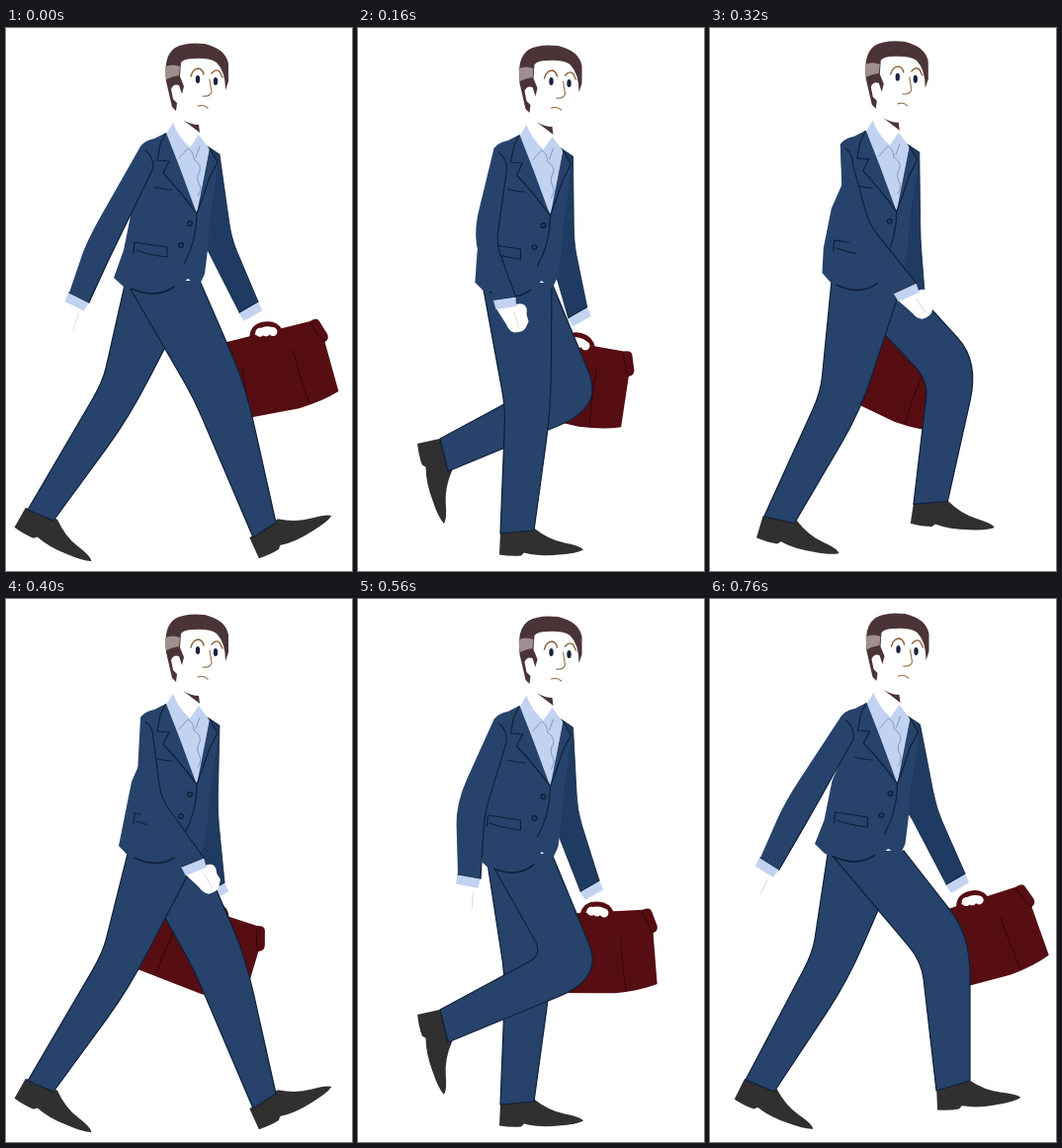
Recreate the animation shown at these times as an HTML page with a canvas. Size 350 by 550 pixels, loop 0.8 s.

```html
<!DOCTYPE html>
<html lang="en">
<head>
<meta charset="utf-8">
<title>Walking man</title>
<style>
  html, body { margin: 0; height: 100%; overflow: hidden; background: #fff; }
  canvas { display: block; width: 100vw; height: 100vh; }
</style>
</head>
<body>
<canvas id="stage" width="350" height="550"></canvas>
<script>
const ctx = document.getElementById('stage').getContext('2d');
const LOOP = 800, STEP = 40;
const SUIT = '#27436b', FAR_SUIT = '#1f3b62', INK = '#101f38', SHIRT = '#c2d2f1';
const HAIR = '#4b3437', SHOE = '#303030', BAG = '#560e13', BAG_INK = '#38060a';

// time, back of knee, back of ankle, front of ankle, front of knee, shoe angle
const LEG = [
  [0, 190, 375, 250, 516, 273, 501, 242, 362, -27],
  [80, 174, 392, 181, 519, 214, 515, 220, 385, 0],
  [160, 149, 385, 144, 512, 178, 509, 195, 385, 0],
  [240, 134, 380, 105, 518, 139, 515, 179, 390, 1],
  [280, 121, 380, 76, 505, 108, 506, 165, 390, 4],
  [360, 104, 358, 36, 487, 65, 499, 139, 387, 24],
  [400, 98, 358, 22, 488, 48, 499, 124, 395, 27],
  [480, 148, 360, 50, 430, 54, 463, 192, 390, 84],
  [560, 187, 360, 83, 416, 91, 449, 248, 384, 75],
  [640, 206, 345, 142, 444, 167, 461, 260, 345, 44],
  [680, 221, 348, 180, 466, 212, 471, 275, 339, 18],
  [760, 214, 367, 229, 498, 263, 488, 263, 341, -5]
];
// time, outer elbow, outer cuff, inner cuff, inner elbow, jacket hem
const NEAR_ARM = [
  [0, 82, 215, 64, 268, 84, 278, 106, 230, 109, 253],
  [80, 97, 207, 93, 281, 114, 284, 119, 235, 120, 264],
  [240, 131, 215, 175, 268, 197, 260, 157, 202, 115, 250],
  [400, 131, 215, 178, 271, 200, 262, 157, 202, 114, 250],
  [560, 99, 207, 101, 279, 124, 283, 128, 218, 126, 267],
  [680, 80, 202, 59, 265, 76, 275, 107, 217, 108, 248],
  [760, 76, 205, 51, 262, 70, 274, 103, 217, 106, 248]
];
// time, outer elbow, outer cuff, bag handle, bag angle
const FAR_ARM = [
  [0, 228, 213, 255, 277, 262, 303, -10],
  [80, 224, 220, 245, 290, 244, 315, 0],
  [240, 214, 215, 221, 275, 210, 312, 25],
  [400, 214, 215, 221, 287, 212, 312, 22],
  [560, 222, 215, 244, 285, 242, 312, 1],
  [680, 228, 210, 257, 275, 262, 301, -13],
  [760, 229, 212, 258, 278, 264, 301, -14]
];
// time, body offset; repeats with every step
const BODY = [[0, 0, 0], [80, 4.5, 6], [160, 1.5, 2], [240, -2, -2], [280, -4, -3], [360, -3.5, -1]];

// Smooth periodic interpolation through the keys
function pose(keys, time, period = LOOP) {
  const t = time % period, n = keys.length;
  const key = j => keys[(j + n) % n];
  const when = j => key(j)[0] + Math.floor(j / n) * period;
  let i = n - 1;
  while (key(i)[0] > t) i--;
  const span = when(i + 1) - when(i), u = (t - when(i)) / span;
  return key(i).slice(1).map((a, k) => {
    const v = j => key(j)[k + 1], b = v(i + 1);
    const slope = j => (v(j + 1) - v(j - 1)) / (when(j + 1) - when(j - 1)) * span;
    return a * (1 + 2 * u) * (1 - u) ** 2 + slope(i) * u * (1 - u) ** 2 +
           b * u * u * (3 - 2 * u) + slope(i + 1) * u * u * (u - 1);
  });
}

function fill(shape, color) {
  ctx.fillStyle = color;
  ctx.fill(new Path2D(shape));
}

function line(shape, color = INK, width = 1.2) {
  ctx.strokeStyle = color;
  ctx.lineWidth = width;
  ctx.stroke(new Path2D(shape));
}

function dot(x, y, rx, ry, color) {
  ctx.fillStyle = color;
  ctx.beginPath();
  ctx.ellipse(x, y, rx, ry, 0, 0, 7);
  ctx.fill();
}

function placed(x, y, angle, draw) {
  ctx.save();
  ctx.translate(x, y);
  ctx.rotate(angle);
  draw();
  ctx.restore();
}

// Path piece from a past a rounded joint to b
function bend(a, joint, b, round) {
  const near = p => joint.map((v, i) => v + (p[i] - v) * round);
  return `L${near(a)}Q${joint} ${near(b)}L${b}`;
}

function drawLeg(time, hipX, bodyY) {
  const [bkx, bky, bax, bay, fax, fay, fkx, fky, angle] = pose(LEG, time);
  const hipBack = [hipX, 256 + bodyY], hipFront = [196, 256 + bodyY];
  const back = [bax, bay], front = [fax, fay];
  placed((bax + fax) / 2, (bay + fay) / 2, angle * Math.PI / 180, () =>
    fill('M-17 0L-18 23Q-6 25 4 24L7 21Q22 25 42 23Q60 22 67 18Q64 14 48 11Q32 8 17-4Z', SHOE));
  const shape = `M${hipBack}` + bend(hipBack, [bkx, bky], back, .14) +
                `L${front}` + bend(front, [fkx, fky], hipFront, .28);
  fill(shape, SUIT);
  line(shape);
}

function drawCuff(x1, y1, x2, y2, extra) {
  const width = Math.hypot(x2 - x1, y2 - y1);
  placed(x1, y1, Math.atan2(y2 - y1, x2 - x1), () => {
    if (extra) extra();
    fill(`M-1 0H${width}L${width - 1} 10H0Z`, SHIRT);
    line(`M0 0H${width}`);
  });
}

function drawBag(x, y, angle) {
  placed(x, y, angle * Math.PI / 180, () => {
    fill('M-55 9L46 2Q53-1 55 3L61 18Q62 24 57 25L62 77Q45 84 20 87L-53 88Z', BAG);
    line('M-15 9Q-13-3 0-3Q11-3 15 7', BAG, 5);
    line('M24 27Q26 60 31 84M-30 35L-31 84M46 4L53 20L57 25', BAG_INK, 1);
    for (const fx of [-6, 0, 7]) dot(fx, 5 + fx / 8, 4.5, 4.5, '#fff');
  });
}

function drawFarArm(time, bx, by) {
  const [ex, ey, cx, cy, hx, hy, angle] = pose(FAR_ARM, time);
  drawBag(hx, hy, angle);
  drawCuff(cx - 19, cy + 11, cx, cy);
  const shoulder = [216 + bx, 128 + by];
  const shape = `M${204 + bx} ${120 + by}L${shoulder}` + bend(shoulder, [ex, ey], [cx, cy], .2) +
                `L${cx - 19} ${cy + 11}L${ex - 24} ${ey + 12}L190 200Z`;
  fill(shape, FAR_SUIT);
  line(shape, INK, .8);
}

function drawHead() {
  fill('M162 54Q159 28 171 20Q181 14 201 16Q222 21 225 36L225 54L222 63Q222 44 213 35Q206 30 190 31' +
       'Q180 31 177 35L176 49L180 59L178 67L175 58Q169 56 167 62L169 72L173 76L172 84L168 80Z', HAIR);
  fill('M161 39Q169 36 176 39L175 48Q168 49 162 52Z', '#a08f91');
  line('M187 49Q189 41 195 41Q199 42 200 47M208 46Q212 41 216 44L219 50', '#8a6238', 1.4);
  line('M206 52L208 65Q206 70 199 69M194 79Q200 77 204 81', '#9a7955', 1.2);
  dot(194, 52, 2.2, 4, '#1a2240');
  dot(212, 54, 2.2, 4, '#1a2240');
  fill('M179 93Q187 98 195 98L196 106Z', HAIR);
}

function drawTorso(dx, dy) {
  const hem = (x, y, part) => `${x + dx * part} ${y + dy * part} `;
  fill('M169 96Q174 110 186 121L195 108L206 123L194 189L170 140L162 107Z', SHIRT);
  line('M175 132L184 122Q190 125 190 133Q198 138 196 145Q192 151 195 157Q199 163 194 170M192 131L196 120', '#8797bd', 1);
  fill(`M162 106L152 111L136 120L138 160L127 185L119 225L${hem(109, 253, 1)}L${hem(119, 262, .8)}` +
       `Q${hem(150, 274, .5)}${hem(172, 263, .4)}L184 254L195 262L201 249L204 225L207 190L215 136L206 122` +
       'L193 188L176 142Z', SUIT);
  line('M161 107L156 118L153 134L165 135L159 147Q176 165 193 188M206 122L214 136L206 151Q200 170 193 188' +
       'Q193 216 180 239M150 161Q160 164 168 164M129 228L130 217L163 222L163 232Q144 230 132 225');
  line(`M${hem(127, 264, .6)}Q${hem(152, 275, .5)}${hem(170, 262, .4)}`, INK, 1.6);
  for (const [x, y] of [[186, 198], [177, 220]]) {
    dot(x, y, 3, 3, INK);
    dot(x, y, 1.6, 1.6, SUIT);
  }
}

function drawNearArm(arm, bx, by) {
  const [oex, oey, ocx, ocy, icx, icy, iex, iey] = arm;
  drawCuff(ocx, ocy, icx, icy, () => {
    fill('M0 8L8 26Q10 34 15 36Q24 37 27 33L31 27L30 20L31 15Q31 9 25 8Z', '#fff');
    line('M18 15L20 31', '#d5d5d8', .8);
  });
  const shoulder = [136 + bx, 120 + by], armpit = [149 + bx, 142 + by];
  const inner = bend([icx, icy], [iex, iey], armpit, .2);
  fill(`M${150 + bx} ${112 + by}Q${140 + bx} ${114 + by} ${shoulder}` +
       bend(shoulder, [oex, oey], [ocx, ocy], .3) + `L${icx} ${icy}` + inner + 'Z', SUIT);
  line(`M${icx} ${icy}` + inner + `Q${149 + bx} ${130 + by} ${141 + bx} ${124 + by}`);
}

function draw(time) {
  ctx.fillStyle = '#fff';
  ctx.fillRect(0, 0, 350, 550);
  ctx.lineJoin = ctx.lineCap = 'round';
  const [bx, by] = pose(BODY, time, LOOP / 2);
  const arm = pose(NEAR_ARM, time);
  const dx = arm[8] - 109, dy = arm[9] - 253, hipX = 121 + dx / 2;
  drawFarArm(time, bx, by);
  drawLeg(time + LOOP / 2, hipX, by);
  drawLeg(time, hipX, by);
  placed(bx, by, 0, () => {
    drawHead();
    drawTorso(dx - bx, dy - by);
  });
  drawNearArm(arm, bx, by);
}

const start = performance.now();
function tick() {
  const elapsed = performance.now() - start;
  draw(Math.floor(elapsed / STEP) * STEP % LOOP);
  requestAnimationFrame(tick);
}
tick();
</script>
</body>
</html>
```
